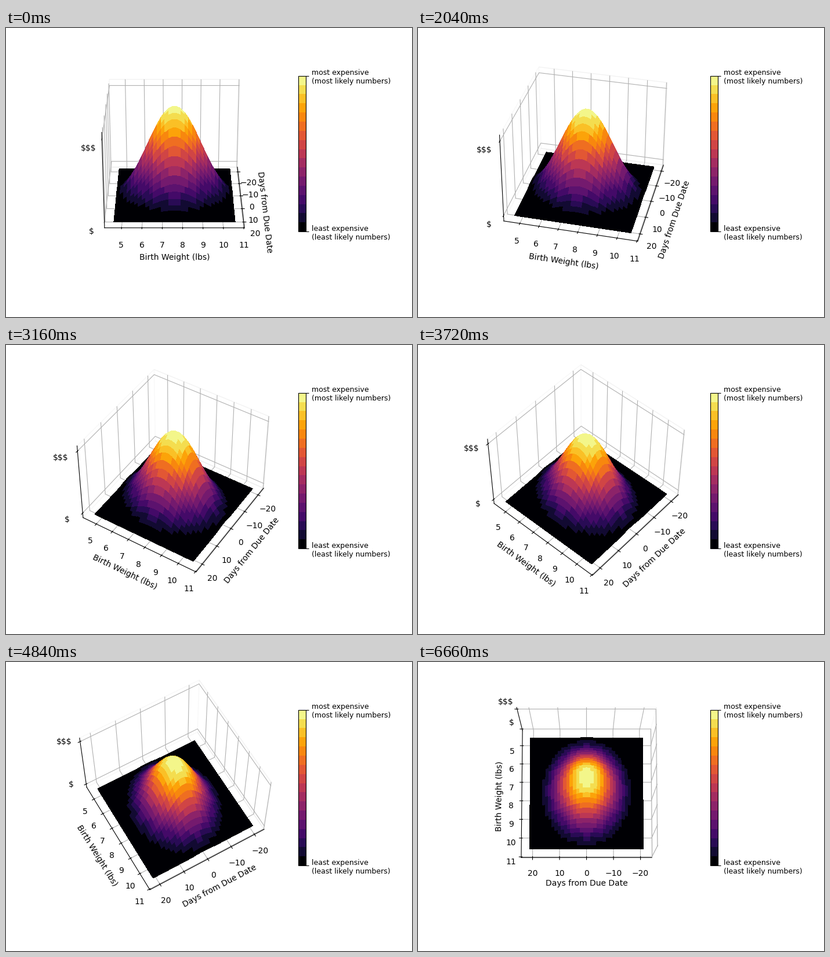
A matplotlib script for the animation above (8000 ms loop, 700x500 px).

```python
import numpy as np
import matplotlib.pyplot as plt
from matplotlib.animation import FuncAnimation
from matplotlib.cm import ScalarMappable
from matplotlib.colors import ListedColormap, Normalize

W, H = 700, 500
LOOP, TICK = 8000, 40            # ms
HOLD, STEP, POSES = 1340, 140, 39
BANDS = 17
FLOOR = 0.075                    # bell height below which the price is flat
MINUS = "\N{MINUS SIGN}"


def rect(left, top, width, height):
    """Pixel box, measured from the top left, as figure fractions."""
    return [left / W, 1 - (top + height) / H, width / W, height / H]


def bell(x, mid, sigma):
    return np.exp(-((x - mid) / sigma) ** 2 / 2)


fig = plt.figure(figsize=(W / 100, H / 100), dpi=100, facecolor="white")
ax = fig.add_axes(rect(104.8, 36.8, 361.7, 361.7), projection="3d")

inferno = plt.get_cmap("inferno")
shades = inferno((np.arange(BANDS) + 0.5) / BANDS)
shades[0] = inferno(0.0)
cmap = ListedColormap(shades)

# Price surface over birth weight and days from the due date
pounds, days = np.meshgrid(np.linspace(4.6, 10.6, 32), np.linspace(-21.1, 21.1, 37))
price = bell(pounds, 7.6, 1.37) * bell(days, 0, 8)
price = np.clip((price - FLOOR) / (1 - FLOOR), 0, 1)
ax.plot_surface(pounds, -days, price, rcount=60, ccount=60,
                cmap=cmap, linewidth=0, antialiased=False)

ax.set_xlim(7.6 - 3.4375, 7.6 + 3.4375)
ax.set_ylim(-24.2, 24.2)
ax.set_zlim(-1 / 48, 1 + 1 / 48)
ax.set_xticks(range(5, 12))
# The days axis runs backwards
ax.set_yticks([-20, -10, 0, 10, 20], ["20", "10", "0", MINUS + "10", MINUS + "20"])
ax.set_zticks([0.05, 0.95], ["$", "$$$"])
ax.set_xlabel("Birth Weight (lbs)")
ax.set_ylabel("Days from Due Date")
ax.zaxis.set_ticks_position("lower")
for axis in (ax.xaxis, ax.yaxis, ax.zaxis):
    axis.pane.set_fill(False)

cax = fig.add_axes(rect(503.7, 82.7, 13.475, 269.5))
bar = fig.colorbar(ScalarMappable(Normalize(0, 1), cmap), cax=cax, ticks=[0, 1])
bar.ax.set_yticklabels(["least expensive\n(least likely numbers)",
                        "most expensive\n(most likely numbers)"], fontsize=9)


def update(i):
    t = i * TICK + TICK // 2
    pose = min(max((t - HOLD) // STEP + 1, 0), POSES)
    p = pose / POSES
    # Stay just inside the right angles so the walls never swap sides
    azim = min(max(-90 + 90 * p, -89.99), -0.01)
    ax.view_init(elev=25 + 55 * p, azim=azim)
    return []


anim = FuncAnimation(fig, update, frames=LOOP // TICK, interval=TICK,
                     repeat=True, repeat_delay=0, blit=False)
plt.show()
```
